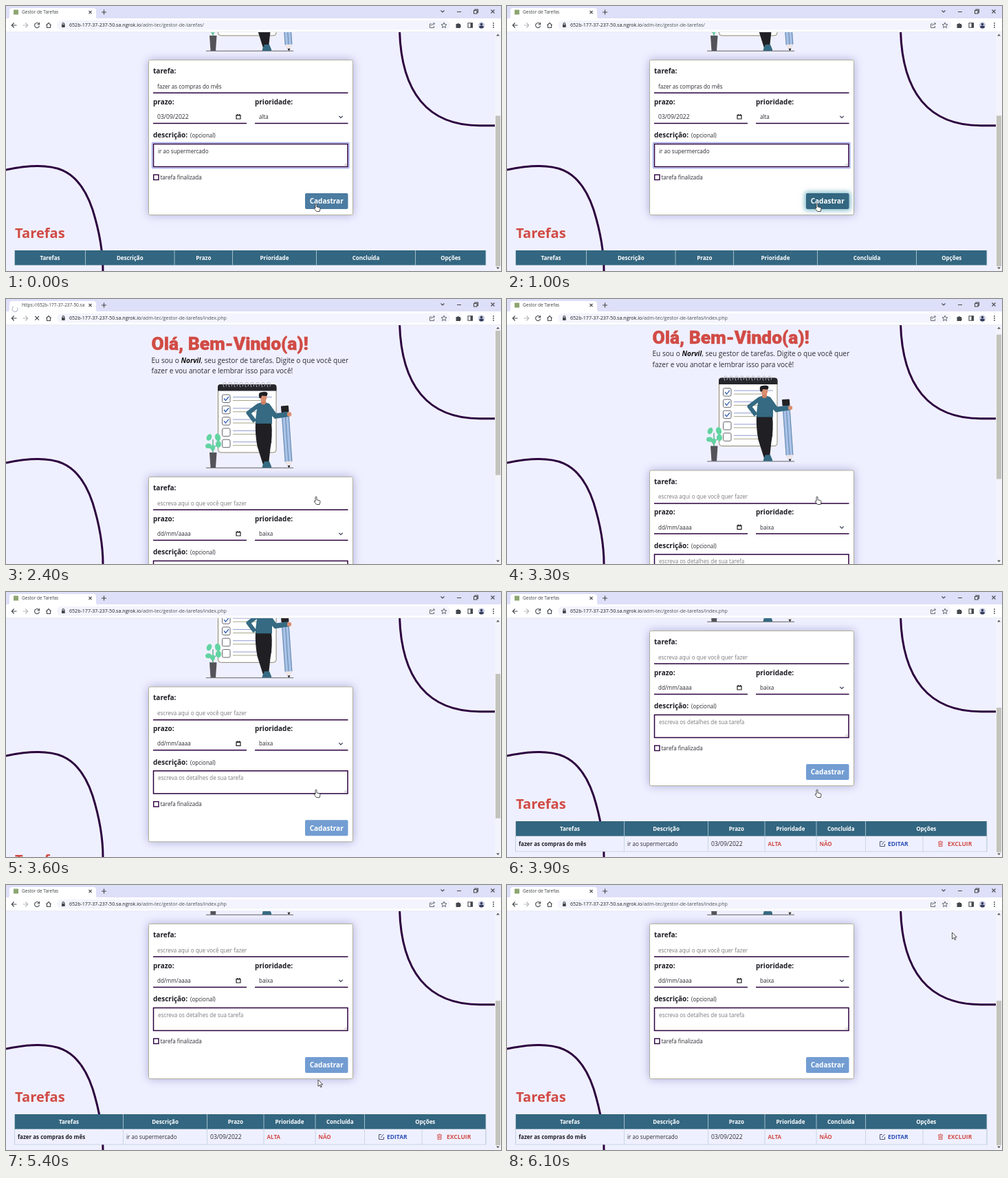
These frames come from a looping animation (720x385 px, 6.2 s). An HTML page:

```html
<!DOCTYPE html>
<html lang="pt-BR">
<head>
<meta charset="utf-8">
<title>Gestor de Tarefas</title>
<style>
  html, body { margin: 0; width: 100%; height: 100%; overflow: hidden; }
  svg { display: block; width: 720px; height: 385px; }
  text { font: 8.05px "Open Sans", "Noto Sans", sans-serif; fill: #2b2b33; white-space: pre; }
  .title { font: 900 26.4px Roboto, sans-serif; fill: #d14b45; stroke: #d14b45; stroke-width: .5; }
  .lead { font-size: 10.1px; }
  .label { font-size: 10px; font-weight: 700; fill: #1d1d24; }
  .h2 { font-size: 20.1px; font-weight: 700; fill: #d14b45; }
  .hint { fill: #7b7b80; }
  .date { font-size: 8.6px; }
  .bold { font-size: 8px; font-weight: 700; fill: #1d1d24; }
  .th { font-size: 8px; font-weight: 700; fill: #fff; text-anchor: middle; }
  .red { font-size: 8px; font-weight: 700; fill: #d14b45; }
  .edit { font-size: 8.5px; font-weight: 700; fill: #2b4fb5; }
  .drop { font-size: 8.5px; font-weight: 700; fill: #d14b45; }
  .btn { font-size: 10px; font-weight: 700; fill: #fff; text-anchor: middle; }
  .tab { font-size: 6.5px; fill: #3c4043; }
  .url { font-size: 7.1px; fill: #50545a; }
  .line { fill: none; stroke: #2c003e; stroke-width: 1.5; }
  .icon { fill: none; stroke: #44484d; stroke-width: 1.1; }
</style>
</head>
<body>
<svg viewBox="0 0 720 385">
  <defs>
    <filter id="blur" x="-30%" y="-30%" width="160%" height="160%"><feGaussianBlur stdDeviation="7"/></filter>
    <filter id="glow" x="-40%" y="-80%" width="180%" height="260%"><feGaussianBlur stdDeviation="3.5"/></filter>
  </defs>
  <rect width="720" height="385" fill="#eff0ff"/>
  <g fill="none" stroke="#2c003e" stroke-width="3">
    <path d="M572.5 36C575 125 613 174 690 173.700L711 173.700"/>
    <path d="M0 238C72 223 106 236 126 296Q141 344 141 385"/>
  </g>

  <g id="page">
    <text class="title" x="211.500" y="74.200">Olá, Bem-Vindo(a)!</text>
    <text class="lead" x="211.500" y="92.500">Eu sou o <tspan font-weight="700" font-style="italic" fill="#111">Norvil</tspan>, seu gestor de tarefas. Digite o que você quer</text>
    <text class="lead" x="211.500" y="108.300">fazer e vou anotar e lembrar isso para você!</text>

    <g id="art">
      <path d="M291 245.300H418" stroke="#444" stroke-width=".8"/>
      <rect x="308.500" y="124.500" width="84.500" height="98.500" rx="4" fill="#fff" stroke="#8c8670"/>
      <path d="M308 133.500V128q0-4 4-4H389.500q4 0 4 4V133.500Z" fill="#26262c"/>
      <g id="rows"></g>
      <path d="M296 223H306.500L305 245H297.500Z" fill="#55535a"/>
      <path d="M301 224V204M301 221L294 212M301 218L310 208" stroke="#2f8f62" fill="none"/>
      <g fill="#62d4a2">
        <ellipse cx="295.500" cy="201" rx="3.600" ry="5" transform="rotate(25 295.500 201)"/>
        <ellipse cx="308" cy="201" rx="4" ry="5.500" transform="rotate(-15 308 201)"/>
        <ellipse cx="294.500" cy="213.500" rx="4.500" ry="3.500"/>
        <ellipse cx="309" cy="211" rx="4" ry="5"/>
        <ellipse cx="301" cy="216" rx="3" ry="4"/>
      </g>
      <g transform="rotate(-4 409 200)">
        <path d="M403 165H414V236L408.500 245 403 236Z" fill="#a9c2e6"/>
        <path d="M403 236H414L408.500 245Z" fill="#f1e6e4"/>
        <path d="M403.700 165V236M408.500 165V236M413.300 165V236" stroke="#6386ae"/>
        <path d="M406.500 242H410.500L408.500 245.500Z" fill="#222"/>
        <rect x="403" y="155" width="11" height="9.500" rx="1" fill="#222226"/>
      </g>
      <path d="M363 178H386Q388 200 384.500 217L382 240H375L376 216 374 200 381 239 374 241 365.500 214Q362 195 363 178Z" fill="#202024"/>
      <path d="M376 236H383L386 243V245H372.500Q373 241 376 236Z" fill="#356a82"/>
      <path d="M366 152Q374 148 383 152L393 166 410 164 411 171 391 174 387 170V181H363V175Z" fill="#356a82"/>
      <path d="M368 154L352.500 165.500 362 178" fill="none" stroke="#356a82" stroke-width="6" stroke-linejoin="round"/>
      <circle cx="412" cy="167.500" r="3.200" fill="#d98e70"/>
      <path d="M371 145H378V152Q374 155 371 152Z" fill="#cf8265"/>
      <ellipse cx="374.500" cy="143" rx="4.800" ry="6.200" fill="#d98e70"/>
      <path d="M368.500 144Q366 136 371 135.500 380 133.500 380.500 137.500L379.500 141 372 140.500 371 144Z" fill="#1f1f24"/>
    </g>

    <rect x="207" y="258" width="298" height="226" fill="#6a6ab4" opacity=".5" filter="url(#blur)"/>
    <rect x="207.500" y="258.500" width="297" height="225" rx="2" fill="#fff" stroke="#b0b09a"/>
    <path class="line" d="M214 306.300H497.500M214 350.500H350M362 350.500H497.500"/>
    <rect id="focus" x="212.500" y="378.500" width="286.500" height="37" rx="1" fill="none" stroke="#a3adf2" stroke-width="1.400"/>
    <rect class="line" x="214.500" y="380.500" width="282.500" height="33"/>
    <path d="M492 411.500L495 408.500M494 412L495.500 410.500" stroke="#777" stroke-width=".6"/>
    <rect x="214.700" y="425.200" width="7.300" height="7.300" fill="#fff" stroke="#2c003e" stroke-width="1.400"/>
    <path d="M335 338.500H341V344H335ZM336.500 337V338M339.500 337V338M335 339H341" fill="none" stroke="#222" stroke-width="1.200"/>
    <path d="M484.300 339.800L487 342.500 489.700 339.800" fill="none" stroke="#303650" stroke-width="1.200"/>
    <g id="labels"></g>
    <rect id="halo" x="433" y="450" width="66.500" height="27" rx="3" fill="#7fb8c8" filter="url(#glow)"/>
    <rect id="button" x="435" y="452" width="62.500" height="23" rx="2"/>
    <text class="btn" x="466.200" y="467.200">Cadastrar</text>
    <g id="before"></g>
    <g id="after"></g>
  </g>

  <g id="scrollbar">
    <rect x="711" y="38" width="9" height="347" fill="#f3f3fb"/>
    <path d="M713 43.500H718L715.500 40.500ZM713 379.500H718L715.500 382.500Z" fill="#606060"/>
    <rect id="thumb" x="712" width="7" fill="#c3c3bd"/>
  </g>

  <g id="browser">
    <rect width="720" height="19" fill="#dedff8"/>
    <path d="M2 18.500Q5 18.500 5 15V7Q5 3 9 3H127Q131 3 131 7V15Q131 18.500 134 18.500Z" fill="#fff"/>
    <rect y="18" width="720" height="20" fill="#fff"/>
    <path d="M0 37.700H720" stroke="#dadce8" stroke-width=".6"/>
    <rect x="74" y="21" width="572" height="13.500" rx="6.700" fill="#f3f4fd"/>
    <rect id="favicon" x="11" y="5.500" width="7" height="7" fill="#8da672"/>
    <path id="spinner" d="M14.500 5A4 4 0 1 0 10.500 9" class="icon" style="stroke:#a9b3c8"/>
    <text id="tabTitle" class="tab" x="23" y="11.300"></text>
    <text class="url" x="92" y="30.300"><tspan fill="#202124">652b-177-37-237-50.sa.ngrok.io</tspan><tspan id="path"></tspan></text>
    <g class="icon">
      <path d="M120.500 7L124.500 11M124.500 7L120.500 11M139 9H146M142.500 5.500V12.500"/>
      <path d="M632.500 6.500L635 9 637.500 6.500M656 8.500H662M680.500 6.500H685V11H680.500ZM682 6.500V5H686.500V9.500H685M705.500 5.500L710.500 10.500M710.500 5.500L705.500 10.500"/>
      <path d="M15.500 28H8.500M11.700 24.500L8.200 28 11.700 31.500"/>
      <path d="M24.500 28H31.500M28.300 24.500L31.800 28 28.300 31.500" stroke="#b4b7bb"/>
      <path id="reload" d="M47.800 25.800A3.500 3.500 0 1 0 48.500 29M48.500 24V27H45.500"/>
      <path id="stop" d="M42.300 25L48 30.700M48 25L42.300 30.700"/>
      <path d="M58.500 28L62 24.500 65.500 28M59.500 27.500V31.500H64.500V27.500"/>
      <path d="M82 27V25.500Q83.300 23.500 84.700 25.500V27"/>
      <path d="M619 26H616.500V31.500H622.500V29M618.500 29Q619 26 623 25.500M621.500 24L623.500 25.500 622 27.500" stroke-width=".8"/>
      <path d="M637 24L638.100 26.700 641 26.900 638.800 28.800 639.500 31.600 637 30.100 634.500 31.600 635.200 28.800 633 26.900 635.900 26.700Z" stroke-width=".8"/>
      <path d="M672 24.700H678.500V31.300H672Z"/>
    </g>
    <g fill="#44484d">
      <rect x="81" y="27" width="4.700" height="4"/>
      <path d="M654.500 26H656.500A1.300 1.300 0 0 1 659 26H661V28A1.300 1.300 0 0 1 661 30.500V32H654.500Z"/>
      <rect x="675.500" y="24.700" width="3" height="6.600"/>
      <circle cx="709" cy="25" r=".9"/><circle cx="709" cy="28" r=".9"/><circle cx="709" cy="31" r=".9"/>
    </g>
    <circle cx="691.500" cy="28" r="4.700" fill="#c7cbe0"/>
    <path d="M688 31Q688 28.500 691.500 28.500T695 31Q691.500 34 688 31Z" fill="#333a5c"/>
    <circle cx="691.500" cy="26.500" r="1.800" fill="#333a5c"/>
  </g>

  <g fill="#fff" stroke="#222" stroke-width=".8" stroke-linejoin="round">
    <path id="hand" transform="translate(448 287)" d="M2 1.200A1 1 0 0 1 4 1.200V4.800L8 5.700Q9 6 9 7.200L8.200 11.500H3.600L.4 7.600Q0 6.500 1 6.300L2 7Z"/>
    <path id="arrow" d="M0 0V9.500L2.200 7.400 3.700 10.800 5.200 10.200 3.700 6.900H6.800Z"/>
  </g>
</svg>

<script>
const LOOP = 6200, LOAD = 1500, COMMIT = 1800, READY = 2800;
const $ = id => document.getElementById(id);
const text = (x, y, s, cls = "") => `<text x="${x}" y="${y}" class="${cls}">${s}</text>`;
const clamp = v => Math.min(1, Math.max(0, v));
const smooth = v => (v = clamp(v), v * v * (3 - 2 * v));
const mix = (a, b, p) => a + (b - a) * p;
const show = (id, on) => $(id).style.display = on ? "" : "none";

// Notepad rings and checklist
let rows = "";
for (let x = 317; x < 388; x += 8)
  rows += `<path d="M${x} 128Q${x - 3} 121.500 ${x + 1} 121.500T${x + 3} 127" fill="none" stroke="#b8bac2"/>`;
for (let i = 0; i < 5; i++) {
  const y = 139 + i * 16.3;
  rows += `<rect x="314.500" y="${y}" width="11.500" height="11.500" rx="2" fill="#fff" stroke="#66666e"/>
    <path d="M330 ${y + 3.5}H387" stroke="#8f9bd0"/><path d="M330 ${y + 8.5}H378" stroke="#a5a58c"/>`;
  if (i < 3) rows += `<path d="M317 ${y + 5.5}L319.500 ${y + 8.5} 324 ${y + 3}" fill="none" stroke="#3c66b8" stroke-width="1.400"/>`;
}
$("rows").innerHTML = rows;

$("labels").innerHTML =
  text(214, 278, "tarefa:", "label") + text(214, 322.7, "prazo:", "label") +
  text(362, 322.7, "prioridade:", "label") + text(214, 371.3, "descrição:", "label") +
  text(268, 371.3, "(opcional)") + text(224.5, 431.5, "tarefa finalizada") +
  text(13, 516.8, "Tarefas", "h2");

const heads = ["Tarefas", "Descrição", "Prazo", "Prioridade", "Concluída", "Opções"];
const table = edges => `<rect x="12.500" y="535" width="685.500" height="21.500" fill="#336680"/>` +
  heads.map((h, i) => text((edges[i] + edges[i + 1]) / 2, 548.7, h, "th")).join("") +
  edges.map(x => `<path d="M${x} 535V556.500" stroke="#bed2df" stroke-width=".8"/>`).join("");

$("before").innerHTML = text(220, 299.5, "fazer as compras do mês") +
  text(220, 344, "03/09/2022", "date") + text(368, 344, "alta") +
  text(221, 393.7, "ir ao supermercado") +
  table([12.5, 115.5, 245, 329.5, 451.5, 595.5, 698]);

const edges = [12.5, 170.5, 292.5, 375, 450, 521.5, 698];
$("after").innerHTML = text(220, 299.5, "escreva aqui o que você quer fazer", "hint") +
  text(220, 344, "dd/mm/aaaa") + text(368, 344, "baixa") +
  text(221, 393.7, "escreva os detalhes de sua tarefa", "hint") +
  `<rect x="12.500" y="556.500" width="685.500" height="22.500" fill="#eff0ff" stroke="#bfd0dc" stroke-width=".8"/>` +
  [...edges, 605].map(x => `<path d="M${x} 556.500V579" stroke="#bfd0dc" stroke-width=".8"/>`).join("") +
  table(edges) +
  text(17, 570.7, "fazer as compras do mês", "bold") + text(175, 570.7, "ir ao supermercado") +
  text(297, 570.7, "03/09/2022", "date") + text(379.5, 570.7, "ALTA", "red") +
  text(454.5, 570.7, "NÃO", "red") + text(554, 570.7, "EDITAR", "edit") + text(641, 570.7, "EXCLUIR", "drop") +
  `<path d="M546 564.500H542.500V571.500H549.500V568M545 569L549.500 564" fill="none" stroke="#35436e" stroke-width=".9"/>
   <path d="M627 565H634M629.500 564H631.500M628 565V571.500H633V565M629.700 566.500V570M631.300 566.500V570" fill="none" stroke="#d14b45" stroke-width=".9"/>`;

function draw(t) {
  const fresh = t >= COMMIT, loading = t >= LOAD && t < READY;
  const max = fresh ? 202 : 180;
  const scroll = fresh ? max * smooth((t - 3210) / 690) : max;
  $("page").setAttribute("transform", `translate(0 ${-scroll})`);
  show("before", !fresh);
  show("after", fresh);
  show("focus", !fresh);

  const view = 347, track = 332, scale = track / (view + max);
  $("thumb").setAttribute("y", 46 + scroll * scale);
  $("thumb").setAttribute("height", view * scale);

  const hover = fresh ? 0 : mix(.6, 1, smooth(t / 500));
  const rgb = [[114, 157, 210], [51, 102, 128]];
  $("button").setAttribute("fill", `rgb(${rgb[0].map((v, i) => Math.round(mix(v, rgb[1][i], hover)))})`);
  $("halo").setAttribute("opacity", clamp((hover - .6) / .4));

  show("spinner", loading);
  show("favicon", !loading);
  show("stop", loading);
  show("reload", !loading);
  $("spinner").setAttribute("transform", `rotate(${t * .4 % 360} 14.500 9)`);
  $("tabTitle").textContent = loading && fresh ? "https://652b-177-37-237-50.sa" : "Gestor de Tarefas";
  $("path").textContent = "/adm-tec/gestor-de-tarefas/" + (fresh ? "index.php" : "");

  const move = smooth((t - 5400) / 650);
  show("hand", t < 4000);
  show("arrow", t >= 4000);
  $("arrow").setAttribute("transform", `translate(${mix(454, 647.5, move)} ${mix(283, 69, move)})`);
}

function tick() {
  draw(Math.floor(performance.now() % LOOP / 100) * 100);
  requestAnimationFrame(tick);
}
tick();
</script>
</body>
</html>
```
